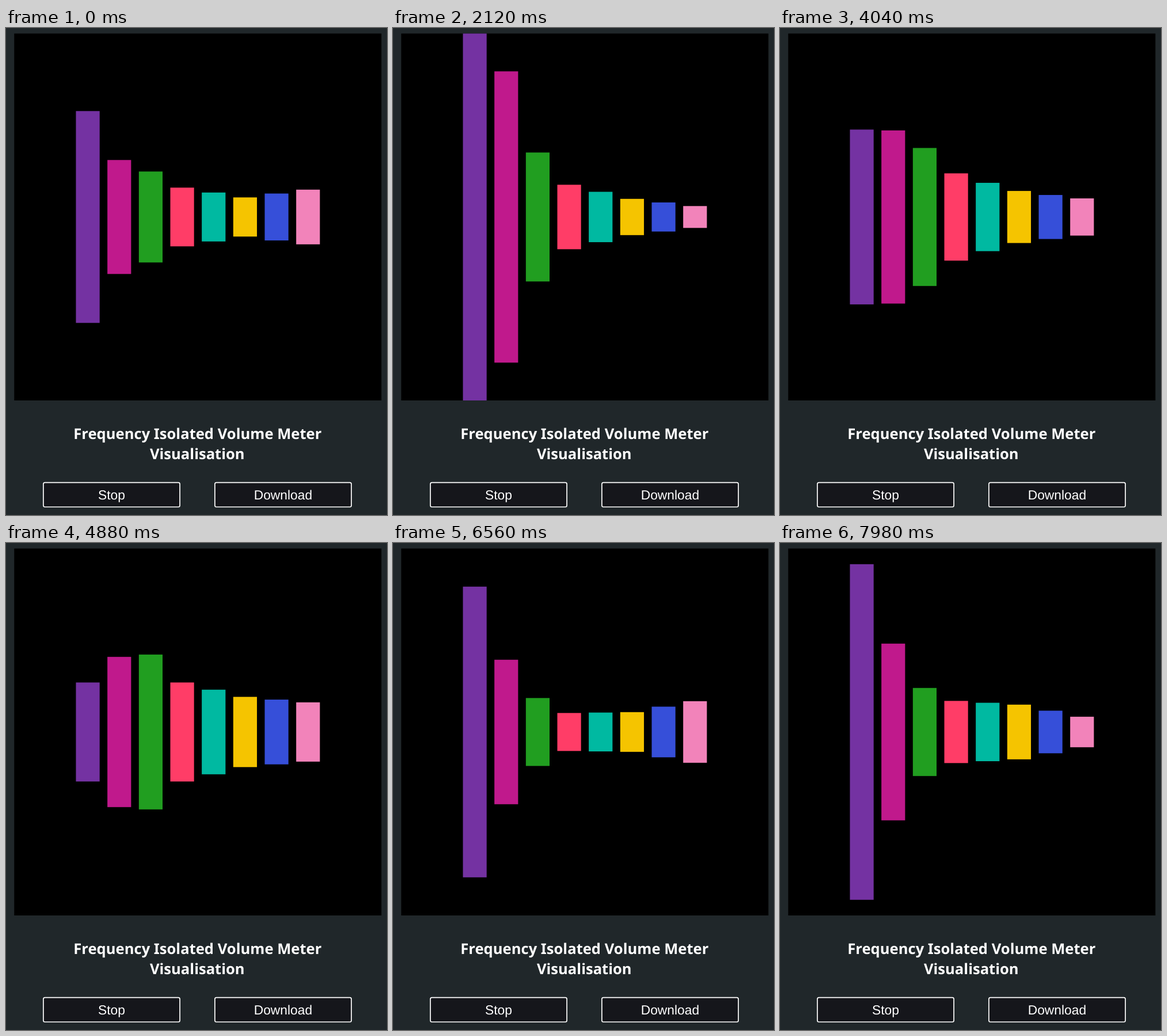
These frames come from a looping animation (662x846 px, 8000 ms). An HTML page:

```html
<!DOCTYPE html>
<html lang="en">
<head>
<meta charset="utf-8">
<title>Volume Meter</title>
<style>
  html, body { margin: 0; width: 100%; height: 100%; overflow: hidden; background: #20272a; }
  svg { display: block; width: 100%; height: 100%; }
  text { fill: #fff; text-anchor: middle; text-rendering: geometricPrecision; }
  .title { font: 700 25.6px "Noto Sans", sans-serif; }
  .button rect { fill: #15161b; stroke: #fff; stroke-width: 1.7; }
  .button text { font: 22.8px "Liberation Sans", Arial, sans-serif; }
</style>
</head>
<body>
<svg viewBox="0 0 662 846">
  <rect width="662" height="846" fill="#20272a"/>
  <rect x="14.3" y="9.6" width="638" height="637.4"/>
  <g id="bars"></g>
  <g class="title">
    <text x="332.8" y="714">Frequency Isolated Volume Meter</text>
    <text x="332.3" y="749">Visualisation</text>
  </g>
  <g class="button">
    <rect x="64.9" y="789.7" width="237.2" height="42.3" rx="2.7"/>
    <text x="183.5" y="819">Stop</text>
  </g>
  <g class="button">
    <rect x="362.9" y="789.7" width="237.2" height="42.3" rx="2.7"/>
    <text x="481.4" y="819">Download</text>
  </g>
</svg>
<script>
const LOOP = 8000, MID = 328.3, FULL = 637.4;
const BEAT = 31, FIRST_BEAT = 15, ATTACK = 3, DECAY = 8;
const COLORS = ['#7432a2', '#c0198c', '#219e20', '#ff3d67', '#00b9a1', '#f5c400', '#364fd9', '#f283ba'];

// Spectrum at a few steps, given at the bands in KNOTS and blended between them
const KNOTS = [0, 1, 2, 3, 5, 7];
const POSES = [
  { step: 0, levels: [368, 198, 158, 102, 68, 95] },
  { step: 29, levels: [262, 158, 98, 67, 56, 82] },
  { step: 46, levels: [638, 506, 224, 112, 63, 38] },
  { step: 70, levels: [132, 153, 129, 104, 63, 38] },
  { step: 104, levels: [172, 261, 269, 172, 122, 103] },
  { step: 140, levels: [505, 251, 118, 66, 69, 107] },
  { step: 171, levels: [583, 307, 153, 108, 95, 53] }
];

const mix = (a, b, u) => a + (b - a) * u;

const group = document.getElementById('bars');
const bars = COLORS.map((fill, i) => {
  const bar = document.createElementNS(group.namespaceURI, 'rect');
  bar.setAttribute('x', 121.5 + i * 54.67);
  bar.setAttribute('width', 41.2);
  bar.setAttribute('fill', fill);
  return group.appendChild(bar);
});

// Three steps every 140 ms: two short ones around a long hold
function stepAt(t) {
  const part = t % 140;
  return 3 * Math.floor(t / 140) + (part >= 120 ? 2 : part >= 20 ? 1 : 0);
}

// Gain of the drum beat: quick attack, slow decay, strongest in the bass
function beat(step, band) {
  const phase = (step - FIRST_BEAT + BEAT) % BEAT;
  const attack = Math.max(0, 1 - (BEAT - phase) / ATTACK);
  return 1 + 4 * Math.pow(0.38, band) * Math.max(attack, Math.exp(-phase / DECAY));
}

// Level of a pose with the beat taken out
function base(pose, band) {
  const k = Math.max(1, KNOTS.findIndex(knot => knot >= band));
  const u = (band - KNOTS[k - 1]) / (KNOTS[k] - KNOTS[k - 1]);
  return mix(pose.levels[k - 1], pose.levels[k], u) / beat(pose.step, band);
}

function level(step, band) {
  const next = Math.max(1, POSES.findIndex(pose => pose.step >= step));
  const from = POSES[next - 1], to = POSES[next];
  const u = (step - from.step) / (to.step - from.step);
  const flutter = 1 + 0.06 * Math.sin(Math.PI * u) * Math.sin(step * 1.1 + band * 0.6);
  return Math.min(FULL, mix(base(from, band), base(to, band), u) * beat(step, band) * flutter);
}

function draw(t) {
  const step = stepAt(t);
  bars.forEach((bar, i) => {
    const h = level(step, i);
    bar.setAttribute('y', MID - h / 2);
    bar.setAttribute('height', h);
  });
}

const start = performance.now();
function tick() {
  draw((performance.now() - start) % LOOP);
  requestAnimationFrame(tick);
}
tick();
</script>
</body>
</html>
```
